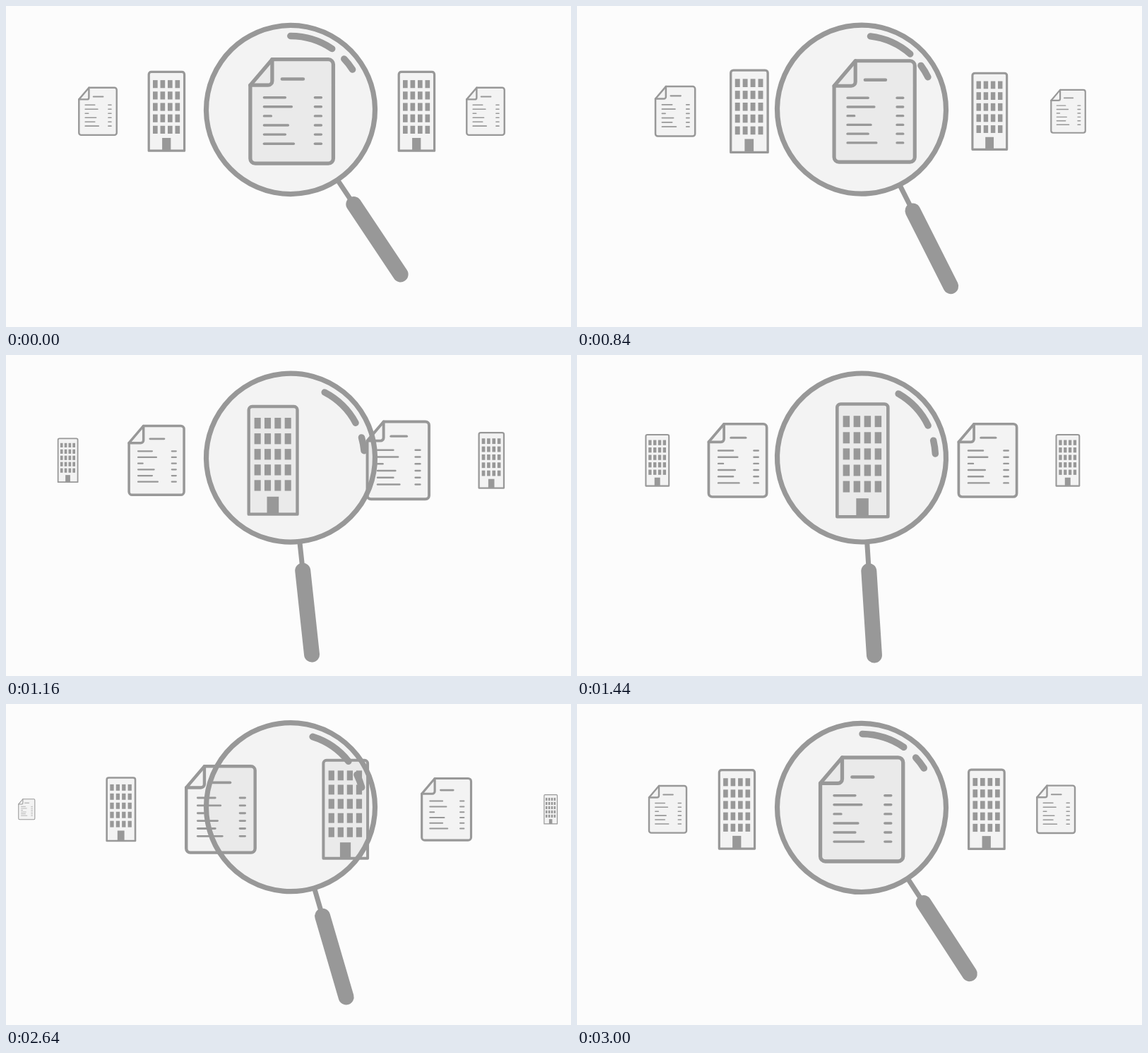
An HTML page with a canvas that plays this animation: 800x455 px, repeating every 3.04 s.

```html
<!DOCTYPE html>
<html lang="en">
<head>
<meta charset="utf-8">
<title>Magnifier</title>
<style>
  html, body { margin: 0; width: 100%; height: 100%; overflow: hidden; background: #fcfcfc; }
  canvas { display: block; }
</style>
</head>
<body>
<canvas id="stage" width="800" height="455"></canvas>
<script>
const ctx = document.getElementById('stage').getContext('2d');
const LOOP = 3040, GRAY = '#989898', TINT = 'rgba(0,0,0,0.034)';
const SCALES = [1, 0.7, 0.455, 0];
const SLOTS = { doc: [0, 177, 274.5, 451.5], building: [0, 177, 290.5, 467.5] };

const mix = (a, b, p) => a + (b - a) * p;

// Cubic bezier (.6, 0, .3, 1) between two times
function ease(t, start, end) {
  const x = Math.min(1, Math.max(0, (t - start) / (end - start)));
  let lo = 0, hi = 1, u = x;
  for (let i = 0; i < 24; i++) {
    u = (lo + hi) / 2;
    const v = 1 - u;
    if (1.8 * u * v * v + 0.9 * u * u * v + u * u * u < x) lo = u; else hi = u;
  }
  return u * u * (3 - 2 * u);
}

function line(x1, y1, x2, y2, width) {
  ctx.lineWidth = width;
  ctx.beginPath();
  ctx.moveTo(x1, y1);
  ctx.lineTo(x2, y2);
  ctx.stroke();
}

function arc(radius, from, to, width) {
  ctx.lineWidth = width;
  ctx.beginPath();
  ctx.arc(0, 0, radius, from * Math.PI / 180, to * Math.PI / 180);
  ctx.stroke();
}

function outline(width) {
  ctx.lineWidth = width;
  ctx.fillStyle = TINT;
  ctx.fill();
  ctx.stroke();
  ctx.fillStyle = GRAY;
}

const icons = {
  doc() {
    ctx.beginPath();
    ctx.moveTo(-27.5, -73.5);
    ctx.arcTo(59, -73.5, 59, 74, 7);
    ctx.arcTo(59, 74, -58.5, 74, 7);
    ctx.arcTo(-58.5, 74, -58.5, -37, 7);
    ctx.lineTo(-58.5, -37);
    ctx.closePath();
    outline(5.3);
    ctx.beginPath();
    ctx.moveTo(-27.5, -73.5);
    ctx.arcTo(-27.5, -37, -58.5, -37, 6);
    ctx.lineTo(-58.5, -37);
    ctx.stroke();
    line(-13.5, -45.7, 16.5, -45.7, 4.5);
    [-9, 0, -29, -5, -9, 3].forEach((end, i) => {
      const y = -19.5 + i * 13.1;
      line(-39, y, end, y, 3.4);
      line(33, y, 42, y, 3.4);
    });
  },
  building() {
    ctx.beginPath();
    ctx.roundRect(-36, -79.7, 72, 159.7, [5, 5, 0, 0]);
    outline(4.6);
    for (let row = 0; row < 5; row++)
      for (let col = 0; col < 4; col++)
        ctx.fillRect(-27.7 + col * 15, -63 + row * 23.1, 9.5, 16);
    ctx.fillRect(-9, 54, 17.5, 26);
  }
};

function drawIcons(t) {
  const second = t > 1800;
  const p = second ? ease(t, 2295, 3084) : ease(t, 627, 1462);
  for (let slot = -3; slot < 3; slot++) {
    const kind = (slot % 2 === 0) !== second ? 'doc' : 'building';
    const place = k => Math.sign(k) * SLOTS[kind][Math.abs(k)];
    const scale = mix(SCALES[Math.abs(slot)], SCALES[Math.abs(slot + 1)], p);
    if (scale < 0.001) continue;
    // The building leaving to the right sets off late
    const move = slot === 1 && !second ? ease(t, 760, 1305) : p;
    ctx.save();
    ctx.translate(404.4 + mix(place(slot), place(slot + 1), move), 149.2);
    ctx.scale(scale, scale);
    icons[kind]();
    ctx.restore();
  }
}

function draw(t) {
  const turn = t > 1800 ? 1 - ease(t, 2250, 3150) : ease(t, 520, 1420);
  const lensY = mix(147, 145.5, turn);
  ctx.fillStyle = '#fcfcfc';
  ctx.fillRect(0, 0, 800, 455);
  ctx.strokeStyle = GRAY;
  ctx.lineCap = 'round';
  ctx.lineJoin = 'round';

  ctx.fillStyle = TINT;
  ctx.beginPath();
  ctx.arc(403, lensY, 119.5, 0, 2 * Math.PI);
  ctx.fill();
  drawIcons(t);

  ctx.save();
  ctx.translate(403, lensY);
  ctx.rotate(-mix(33.7, 3.67, turn) * Math.PI / 180);
  arc(119.5, 0, 360, 7.2);
  arc(104.5, -56.4, -22.1, 9.5);
  arc(104.5, -9.8, 0.7, 9.5);
  line(0, 120, 0, 158, 7);
  line(0, 161, 0, 280.5, 22);
  ctx.restore();
}

function tick() {
  draw(performance.now() % LOOP);
  requestAnimationFrame(tick);
}
tick();
</script>
</body>
</html>
```
